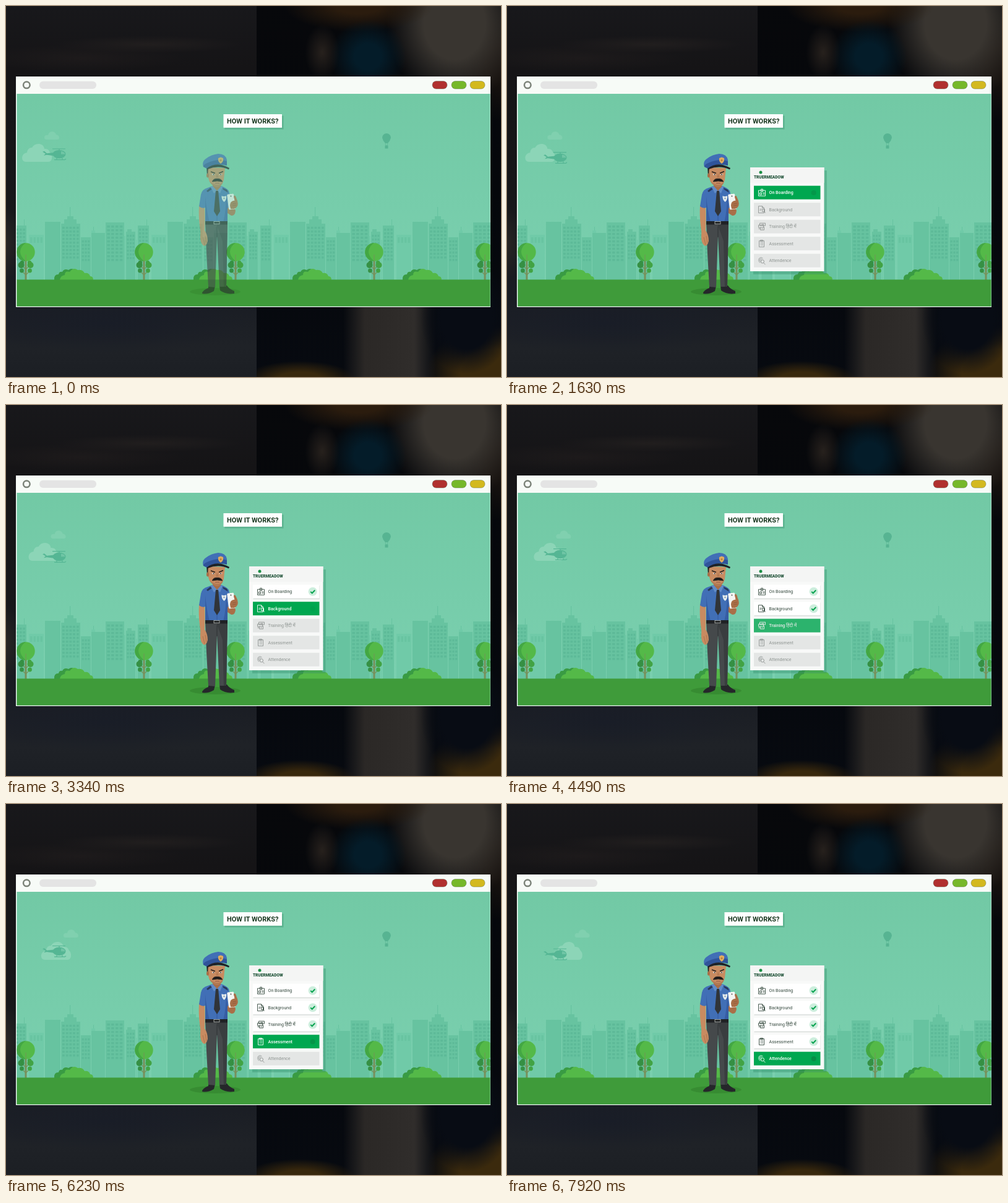
Recreate the animation shown at these times as an HTML page. Size 800 by 600 pixels, loop 8 s.

```html
<!DOCTYPE html>
<html lang="en">
<head>
<meta charset="utf-8">
<title>How it works</title>
<style>
html, body { margin: 0; width: 100%; height: 100%; overflow: hidden; background: #101217; }
#photo, svg { position: absolute; left: 0; top: 0; width: 800px; height: 600px; }
#photo { overflow: hidden; }
#photo div { position: absolute; top: 0; height: 600px; }
#left {
  left: 0; width: 405px;
  background:
    radial-gradient(150px 14px at 230px 62px, #211e1e, transparent),
    radial-gradient(170px 22px at 120px 84px, #1d1a1b, transparent),
    radial-gradient(24px 60px at 0 385px, #292624, transparent),
    radial-gradient(230px 50px at 160px 512px, #191d27, transparent),
    linear-gradient(#18181b, #151416 17%, #171719 50%, #1a1d24 80%, #1f2227 92%, #1c1f24);
}
#right {
  left: 405px; width: 395px;
  background:
    radial-gradient(28px 45px at 106px 75px, #27211d, transparent),
    radial-gradient(62px 60px at 180px 82px, #041c29 35%, transparent),
    radial-gradient(120px 42px at 165px 0, #2b1c0e 30%, transparent),
    radial-gradient(110px 130px at 320px 28px, #393530 45%, transparent),
    radial-gradient(75px 95px at 392px 92px, #17120f 30%, transparent),
    radial-gradient(90px 30px at 70px 604px, #38280d 40%, transparent),
    radial-gradient(75px 90px at 340px 505px, #080c14 55%, transparent),
    radial-gradient(110px 75px at 385px 592px, #3b2a0d 50%, transparent),
    linear-gradient(90deg, transparent 140px, #2b2826 175px, #302d2b 255px, transparent 290px) 0 485px / 395px 115px no-repeat,
    linear-gradient(#07080b, #05070b 50%, #070a10);
}
text { font-family: Roboto, "Noto Sans", "Noto Sans Devanagari", sans-serif; }
</style>
</head>
<body>
<div id="photo"><div id="left"></div><div id="right"></div></div>
<svg id="stage" viewBox="0 0 800 600" xmlns="http://www.w3.org/2000/svg"></svg>
<script>
const LOOP = 8000;
const GREEN = [0, 167, 80], WHITE = [255, 255, 255];
const GREY = [228, 230, 229], DULL = [143, 149, 146], INK = [52, 72, 61];

const clamp = v => Math.max(0, Math.min(1, v));
const ramp = (t, from, to) => clamp((t - from) / (to - from));
const blend = (a, b, p) => a.map((v, i) => v + (b[i] - v) * p);
const rgb = c => `rgb(${c.map(Math.round)})`;
const rect = (x, y, w, h, fill, more = '') =>
  `<rect x="${x}" y="${y}" width="${w}" height="${h}" fill="${fill}" ${more}/>`;
const oval = (x, y, rx, ry, fill, more = '') =>
  `<ellipse cx="${x}" cy="${y}" rx="${rx}" ry="${ry}" fill="${fill}" ${more}/>`;
const disc = (x, y, r, fill, more) => oval(x, y, r, r, fill, more);
const path = (d, fill, more = '') => `<path d="${d}" fill="${fill}" ${more}/>`;
const line = (d, color, w, more = '') => path(d, 'none', `stroke="${color}" stroke-width="${w}" ${more}`);

// --- Scenery -----------------------------------------------------------
function building(x, w, top, fill, cols = 0) {
  let s = rect(x, top, w, 443 - top, fill);
  const gap = w / (cols + 0.4);
  for (let c = 0; c < cols; c++)
    for (let y = top + 5; y < 410; y += 6)
      s += rect((x + gap * (c + 0.35)).toFixed(1), y, (gap * 0.65).toFixed(1), 3.4, '#5dba98');
  return s;
}

function cityBlock() {
  const mid = '#67c3a0', pale = '#70caa8';
  return building(172, 24, 370, pale) +
    [0, 1, 2, 3].map(c => rect(174 + c * 5.5, 374, 3.5, 9, '#68c4a1')).join('') +
    building(0, 25, 349, mid) +
    rect(40, 325, 1.2, 18, mid) + rect(36, 340, 10, 5, mid) + rect(31, 345, 20, 8, mid) +
    building(26, 31, 352, mid, 5) +
    building(58, 16, 374, mid, 3) +
    rect(78, 357, 1, 10, mid) + rect(75, 363, 6, 4, pale) + building(75, 22, 367, mid) +
    building(98, 30, 350, mid, 4) +
    building(131, 15, 365, mid, 3) + rect(133, 361, 7, 4, mid) +
    rect(164, 345, 1, 10, mid) + building(150, 18, 355, mid, 3) +
    rect(25, 352, 1, 90, '#7ed1b0') + rect(128, 372, 2, 70, pale) + rect(147, 378, 2, 64, pale);
}

function tree(x) {
  const leaf = '#42a344', dark = '#369044';
  let s = rect(-1.5, 396, 3, 47, '#78905a');
  for (const side of [-1, 1])
    s += line(`M0 426L${side * 7} 419M0 435L${side * 6} 429`, '#78905a', 1.2) +
      disc(side * 7.5, 419, 5, side < 0 ? dark : leaf) +
      disc(side * 6, 415, 3.2, side < 0 ? dark : leaf) +
      disc(side * 6.5, 428, 3.4, side < 0 ? dark : leaf);
  s += disc(0, 398, 14.7, '#54b948') +
    path('M0 383.3A14.7 14.7 0 0 0 0 412.7Q-9 405 -9 397Q-8 388 0 383.3', '#43a743') +
    line('M0 402V414', '#69a052', 1.5);
  return `<g transform="translate(${x})">${s}</g>`;
}

const bush = x => `<g transform="translate(${x})">` +
  path('M-31 443Q-32 434 -24 434Q-23 429 -18 430Q-15 424 -8 427Q-3 423 2 427L10 443z', '#399b43') +
  path('M-22 443Q-21 436 -14 435Q-14 428 -6 430Q0 422 7 427Q15 426 18 432Q25 431 27 437Q32 437 32 443z', '#54b948') + '</g>';

const bigCloud = path('M6 252Q0 252 0 245Q1 238 8 237Q9 229 16 229Q20 222 28 223Q35 224 36 231Q43 230 45 237Q49 240 48 247Q47 252 42 252z', '#8cd5b7');
const smallCloud = path('M39 216Q36 216 36 212Q37 208 42 209Q43 203 49 203Q54 204 55 208Q60 209 60 213Q60 216 57 216z', '#80d0af');

const copter = oval(86, 0, 10.5, 6.8, '#55b694') +
  path('M59 -4L62 -5L66 -1.5L80 -3L81 3L66 1L61 2L64 -1z', '#55b694') +
  path('M89 -5Q95 -4 95.5 0L89 0z', '#6fc5a5') +
  line('M75 -8.7H96M86 -9V-6M78 9H95L97 7.5M82 6V9M91 6V9', '#55b694', 1.2);

const scenery = rect(17, 142, 766, 344, 'url(#sky)') +
  `<g id="clouds">${bigCloud}${smallCloud}</g><g id="copter">${copter}</g>` +
  path('M608 213A7 7 0 0 1 622 213Q621 218 617 222H613Q609 218 608 213', '#57b492') +
  line('M613 222L614 226M617 222L616 226', '#57b492', 0.6) + rect(612.5, 225.5, 5, 5, '#57b492') +
  [-135, 63, 261, 459, 657].map(x => `<use href="#block" x="${x}"/>`).join('') +
  [109, 334, 494, 672].map(bush).join('') + [32, 223, 371, 595, 774].map(tree).join('') +
  rect(17, 442.5, 766, 44, '#3f9b3a');

// --- Officer -----------------------------------------------------------
const SKIN = '#c88b61', SHADE = '#a96e47', BLUE = '#416fb6', NAVY = '#30549a', COAL = '#25272a';

const officer = oval(338, 462, 41, 6, '#34872f', 'opacity=".75"') +
  path('M327 451L338 453L336 461Q326 467 317 465Q317 460 327 456z', COAL) +
  path('M345 452L357 452Q361 458 369 461L369 465Q355 467 346 460z', COAL) +
  path('M322 351H358L356 454H345L341 372L338 455L327 454L324 400z', '#45494b') +
  path('M340 352H358L356 454H352L350 380z', '#393d3f') +
  line('M341 356V374', '#2f3335', 1) +
  path('M312 322L321 324Q322 345 321 363Q326 370 326 380Q324 388 320 388Q314 384 314 374Q315 365 313 355Q311 340 312 322', SKIN) +
  line('M318 374L321 386M322 372L324 383', SHADE, 0.8) +
  path('M358 320L365 317L371 331Q370 340 364 339L358 335z', SHADE) +
  path('M334 291L326 294Q317 296 315 305L312 324Q317 328 322 326L322 350H358V327L366 322L360 299Q356 294 348 291z', BLUE) +
  path('M322 308L322 350H329Q324 330 322 308M356 304L358 327V350H351Q356 330 356 304', NAVY, 'opacity=".65"') +
  line('M341 300V349', NAVY, 0.8) +
  path('M324 299L330 294L333 296L326 301zM350 294L357 297L359 302L351 297z', '#28395c') +
  rect(322, 348, 36, 5.5, '#202225') +
  rect(336, 348.5, 9, 4.2, '#25282a', 'stroke="#b9bdb7" stroke-width=".8"') +
  path('M334 282H347V294L341 300L334 294z', SHADE) +
  path('M334 291L341 299L336 303L331 293zM348 291L341 299L346 303L350 293z', '#608bc8') +
  path('M339 299H343L346 332L341 340L336 332z', '#303439') +
  path('M348.5 307Q352 309 356 307Q357 313 352.5 317Q348 313 348.5 307', '#e8eef0') +
  disc(352.5, 311, 1.6, '#9db1c1') +
  // head
  path('M324 260L325 274L328 279L331 262z', '#272322') +
  path('M327 261Q325 276 329 284Q333 291 341 292Q350 291 352 281L354 262z', SKIN) +
  path('M328 282Q334 289 341 289Q348 289 351 283Q350 291 341 293Q332 291 328 282', '#b27a55') +
  oval(326, 274, 2, 3.5, SHADE) +
  line('M331 268L338 270.5M344 270.5L351 267.5', '#29211e', 1.6) +
  oval(335, 272.5, 2.2, 1.1, '#eee') + oval(347, 272.5, 2.2, 1.1, '#eee') +
  disc(335.5, 272.5, 0.9, '#222') + disc(347, 272.5, 0.9, '#222') +
  path('M341 270L339 278H344z', '#b67b54') +
  path('M333.5 284Q335 279 341 279.5Q348 279 349.5 284Q341 282 333.5 284', '#211c1b', 'stroke="#211c1b"') +
  line('M338 286.5H345', '#945944', 1) +
  // cap
  path('M319 260Q316 252 323 247Q332 240 343 239Q355 239 357 249L357 258Q339 253 325 263z', BLUE) +
  path('M319 260Q318 257 325 254Q343 246 357 251L357 258Q339 253 325 263z', NAVY) +
  path('M324 263Q340 250 361 262L360 264.5Q344 257 326 264z', '#1f2228') +
  path('M343 246L347 244.5L351 246Q352 252 347 255Q342 252 343 246', '#e0ac5f') + disc(347, 249.5, 1.5, '#b67e42') +
  // phone and hand
  path('M362 312L370 309Q376 314 374 323Q370 329 364 329L360 326z', SHADE) +
  `<g transform="rotate(-7 364 316)">${rect(358.5, 304, 11, 25, '#f5f6f4', 'rx="1.8"')}${disc(364.5, 307.5, 1, '#555')}</g>` +
  path('M365 316Q370 313 374 317Q376 323 371 327Q367 329 363 328L362 323Q362 318 365 316', SHADE) +
  line('M366 320L372 319M366 323L372 322', '#8d5738', 0.7) +
  `<g id="thumb">${oval(370.5, 310.5, 1.8, 4, SHADE, 'transform="rotate(-18 370 311)"')}</g>`;

// --- Panel -------------------------------------------------------------
const steps = [
  { label: 'On Boarding', on: 1400, done: 2700, icon: 'M1 3H12V12H1zM5 1H8V5H5zM3 7H6V10H3zM8 7H11M8 9H11' },
  { label: 'Background', on: 3170, done: 3900, icon: 'M1 1H7L10 4V12H1zM7 1V4H10M3 6H6M3 8H5M7 6H11V10H7zM10 9L12 12' },
  { label: 'Training हिंदी में', on: 4370, done: 5430, icon: 'M3 1H12V5H3zM1 4H9V8H1zM4 8V12H10V7M1 10H4M6 3H10M6 10H8' },
  { label: 'Assessment', on: 5980, done: 6915, icon: 'M2 2H10V12H2zM4 1H8V3H4zM4 5H5M6 5H8M4 7H5M6 7H8M4 9H5M6 9H8' },
  { label: 'Attendence', on: 7340, done: 9000, icon: 'M3 10Q0 6 2 3Q5 0 8 3M3 7Q3 3 6 4M5 9Q4 7 6 6M10 8A2.7 2.7 0 1 0 4.6 8A2.7 2.7 0 1 0 10 8M9 10L12 13' }
];

const row = (s, i) => `<g class="row" transform="translate(399 ${290.7 + i * 27.5})">` +
  rect(0.5, 1.2, 107.5, 22.2, '#8d9992', 'class="edge" opacity="0"') +
  rect(0, 0, 107.5, 22, '#fff', 'class="face"') +
  line(s.icon, '#888', 0.9, 'class="icon" transform="translate(6.5 4.5)"') +
  `<text class="label" x="24.5" y="13.7" font-size="7.1">${s.label}</text>` +
  disc(96.7, 11, 7, '#cdeedd', 'class="badge"') + disc(96.7, 11.2, 4, '#098744', 'class="dot"') +
  `<g class="tick">${line('M-3.5 .2L-1 2.6L3.6 -2.2', '#0ba451', 2)}</g></g>`;

const panel = rect(398, 266, 119, 168, '#2f8a68', 'opacity=".36"') +
  rect(393, 261, 119.5, 168, '#f8f9f8') + rect(393, 261, 119.5, 25, '#f4f5f4') +
  disc(410, 269, 2.5, '#1c8f45') +
  '<text x="399" y="278.5" font-size="6.5" font-weight="900" fill="#1d5136">TRUERMEADOW</text>' +
  steps.map(row).join('');

// --- Browser window ----------------------------------------------------
const pill = (x, fill) => rect(x, 121.5, 24, 12.5, fill, 'rx="6.2" stroke="#50604a" stroke-opacity=".5" stroke-width=".8"');

const stage = document.getElementById('stage');
stage.innerHTML = `<defs>
  <linearGradient id="sky" x1="0" y1="0" x2="0" y2="1">
    <stop offset="0" stop-color="#72c9a5"/><stop offset="1" stop-color="#7bd0b0"/>
  </linearGradient>
  <clipPath id="view">${rect(17.5, 142, 765, 343.7, '#000')}</clipPath>
  <g id="block">${cityBlock()}</g></defs>` +
  rect(16, 114, 767, 373, '#f7fbf7') +
  disc(33.3, 127.8, 5.3, 'none', 'stroke="#7b8278" stroke-width="2.5"') +
  rect(54, 121.7, 92, 12.3, '#e4e4e4', 'rx="6"') +
  pill(689, '#b1302f') + pill(720, '#76b82a') + pill(750, '#d3b91f') +
  `<g clip-path="url(#view)">${scenery}</g>` +
  rect(353.5, 177.5, 95, 22, '#398d6c', 'opacity=".4"') + rect(351.5, 175, 94.5, 21.8, '#fff') +
  '<text x="398.7" y="189.6" font-size="11" font-weight="700" text-anchor="middle" fill="#18371f">HOW IT WORKS?</text>' +
  `<g id="officer">${officer}</g><g id="panel">${panel}</g>`;

const byId = id => document.getElementById(id);
const parts = ['clouds', 'copter', 'officer', 'thumb', 'panel'].reduce((o, id) => (o[id] = byId(id), o), {});
const rows = [...stage.querySelectorAll('.row')].map(g =>
  Object.fromEntries(['edge', 'face', 'icon', 'label', 'badge', 'dot', 'tick'].map(n => [n, g.querySelector('.' + n)])));

function drawRow(r, s, t) {
  const on = ramp(t, s.on, s.on + 150), done = ramp(t, s.done, s.done + 170);
  const ticked = ramp(t, s.done + 90, s.done + 320);
  const ink = rgb(blend(blend(DULL, WHITE, on), INK, done));
  r.face.setAttribute('fill', rgb(blend(blend(GREY, GREEN, on), WHITE, done)));
  r.label.setAttribute('fill', ink);
  r.label.setAttribute('font-weight', on > 0.5 && done < 0.5 ? 500 : 400);
  r.icon.setAttribute('stroke', ink);
  r.edge.setAttribute('opacity', 0.3 * done);
  r.badge.setAttribute('opacity', done);
  r.dot.setAttribute('opacity', 0.8 * ramp(t, s.on + 140, s.on + 290) * (1 - done));
  r.tick.setAttribute('opacity', clamp(ticked * 5));
  r.tick.setAttribute('transform',
    `translate(96.7 11) rotate(${-65 * (1 - ticked)}) scale(${0.6 + 0.4 * ticked})`);
}

function draw(t) {
  const sec = t / 1000;
  const drift = 26 + 1.06 * sec + 0.624 * sec * sec;
  parts.clouds.setAttribute('transform', `translate(${drift})`);
  const bob = 242.3 + 4.2 * Math.cos((sec - 2.5) * Math.PI / 3.5);
  parts.copter.setAttribute('transform', `translate(0 ${bob})`);
  parts.officer.setAttribute('opacity', 0.6 + 0.4 * ramp(t, 0, 150));
  parts.thumb.setAttribute('transform', `translate(0 ${0.8 * Math.sin(sec * 8)})`);
  const rise = ramp(t, 700, 1300);
  parts.panel.setAttribute('opacity', rise);
  parts.panel.setAttribute('transform', `translate(0 ${30 * (1 - rise) ** 2})`);
  rows.forEach((r, i) => drawRow(r, steps[i], t));
}

const start = performance.now();
function tick(now) {
  draw(Math.max(0, now - start) % LOOP);
  requestAnimationFrame(tick);
}
draw(0);
requestAnimationFrame(tick);
</script>
</body>
</html>
```
